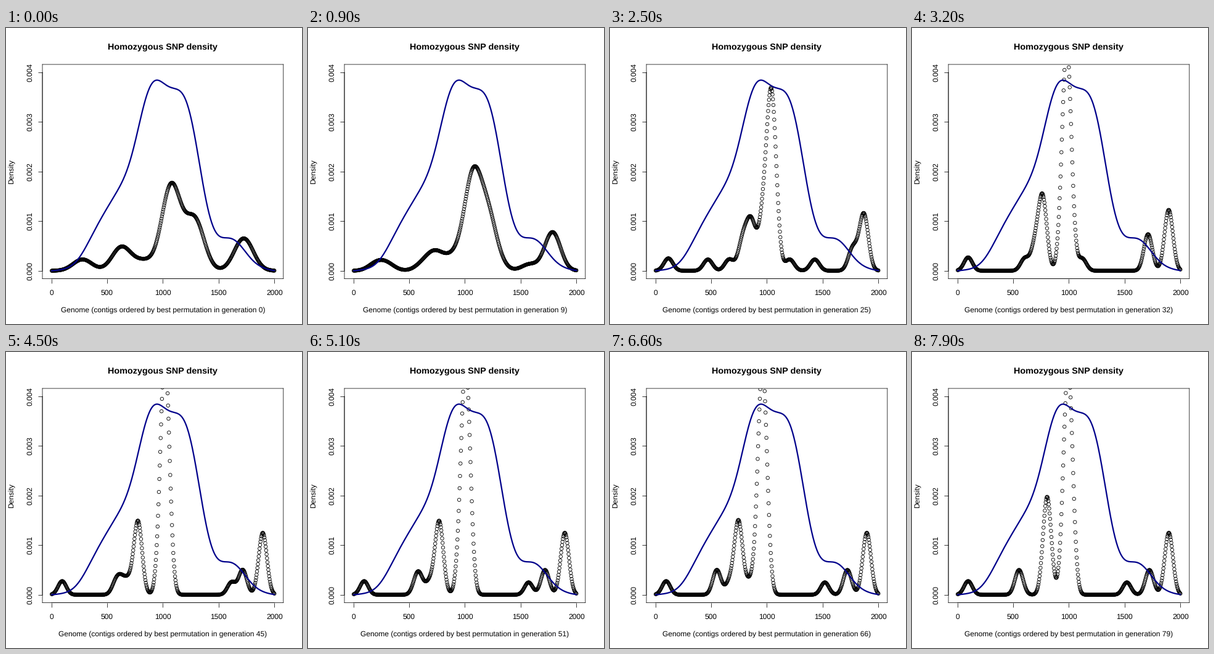
A matplotlib script that plays this animation: 480x480 px, repeating every 8 s.

```python
import numpy as np
import matplotlib.pyplot as plt
from matplotlib.animation import FuncAnimation

plt.rcParams.update({
    "font.family": "Liberation Sans",
    "font.size": 12,
    "text.hinting": "none",
    "toolbar": "None",
})

SIZE, DPI = 480, 72          # at 72 dpi one point is one pixel
FRAMES, INTERVAL = 80, 100
LEFT, RIGHT, TOP, BOTTOM = 59.04, 449.76, 59.04, 406.56
X = np.linspace(3, 2000, 512)

# Groups of contigs: weight, then the place each holds at the POSE generations
POSES = (0, 17, 32, 58)
CONTIGS = np.array([
    (1.1, 280, 140, 97, 97),
    (1, 280, 320, 605, 553),
    (1, 630, 625, 700, 553),
    (1, 630, 1000, 700, 673),
    (2.4, 630, 815, 769, 758),
    (1.7, 830, 1000, 769, 758),
    (1.8, 1075, 1000, 769, 758),
    (4, 1075, 1000, 960, 960),
    (9, 1075, 1110, 985, 985),
    (7.4, 1285, 1142, 1007, 1007),
    (1, 1285, 1310, 1125, 868),
    (1, 1075, 1110, 1710, 1520),
    (2, 1725, 1840, 1710, 1722),
    (1, 1285, 1840, 1895, 1896),
    (4, 1725, 1840, 1895, 1896),
])

# Reference density (x 0.001), read every 125 units
REF_STEP = 125
REF = [0, .045, .265, .76, 1.265, 1.75, 2.59, 3.66, 3.79, 3.66, 3.1, 1.56,
       .71, .64, .355, .09, .005]


def bells(x, centers, width):
    return np.exp(-.5 * ((x[:, None] - centers) / width) ** 2)


def ramp(gen, start, end):
    return np.clip((gen - start) / (end - start), 0, 1)


def places(gen):
    x = np.array([np.interp(gen, POSES, track) for track in CONTIGS[:, 1:]])
    # the settled centre sways to and fro, strongest at the main peak
    sway = 29 * ramp(gen, 17, 32) * np.cos(2 * np.pi * (gen - 45) / 44)
    x += sway * np.exp(-((x - 985) / 250) ** 2)
    # the groups left of the main peak gather at the end
    side = (x > 620) & (x < 900)
    return np.where(side, x + ramp(gen, 66, 79) * (805 - x), x)


def density(gen):
    width = 37 + 48 * np.exp(-(gen / 15.5) ** 2)
    return bells(X, places(gen), width) @ CONTIGS[:, 0] * 9.25 / width


def reference():
    """Sum of equal bells passing through the readings."""
    knots = np.arange(len(REF)) * REF_STEP
    weights = np.linalg.solve(bells(knots, knots, REF_STEP), REF)
    return bells(X, knots, REF_STEP) @ weights


def label(x, y, text, **kw):
    return fig.text(x / SIZE, 1 - y / SIZE, text, ha="center", va="baseline",
                    rotation_mode="anchor", **kw)


def to_px(x, y):
    return (LEFT + (x + 80) / 2160 * (RIGHT - LEFT),
            BOTTOM - (y + .16) / 4.32 * (BOTTOM - TOP))


fig = plt.figure(figsize=(SIZE / DPI, SIZE / DPI), dpi=DPI, facecolor="white")
ax = fig.add_axes([LEFT / SIZE, 1 - BOTTOM / SIZE,
                   (RIGHT - LEFT) / SIZE, (BOTTOM - TOP) / SIZE])
ax.set(xlim=(-80, 2080), ylim=(-.16, 4.16),
       xticks=range(0, 2001, 500), yticks=range(5))
ax.tick_params(length=7.2, width=.75, labelbottom=False, labelleft=False)
for spine in ax.spines.values():
    spine.set(linewidth=.75, snap=False)
for tick in ax.get_xticklines() + ax.get_yticklines():
    tick.set_snap(False)

# axis lines over the frame
for xs, ys in (((0, 2000), (-.16, -.16)), ((-80, -80), (0, 4))):
    ax.plot(xs, ys, color="black", lw=.75, clip_on=False, snap=False, zorder=3)

mid_x, mid_y = (LEFT + RIGHT) / 2, (TOP + BOTTOM) / 2
label(mid_x, 35, "Homozygous SNP density", size=14.4, weight="bold")
label(13, mid_y, "Density", rotation=90)
for v in range(0, 2001, 500):
    label(to_px(v, 0)[0], 433, str(v))
for v in range(5):
    label(42, to_px(0, v)[1], f"0.00{v}", rotation=90)
caption = label(mid_x, 462, "")

dots = ax.scatter(X, density(0), s=5.4 ** 2, facecolors="none",
                  edgecolors="black", linewidths=.85, zorder=2)
ax.plot(X, reference(), color="#00008b", lw=2.25,
        solid_capstyle="round", zorder=3)


def update(gen):
    dots.set_offsets(np.column_stack([X, density(gen)]))
    caption.set_text("Genome (contigs ordered by best permutation "
                     f"in generation {gen})")
    return dots, caption


anim = FuncAnimation(fig, update, frames=FRAMES, interval=INTERVAL,
                     repeat=True, repeat_delay=0, blit=False)
plt.show()
```
